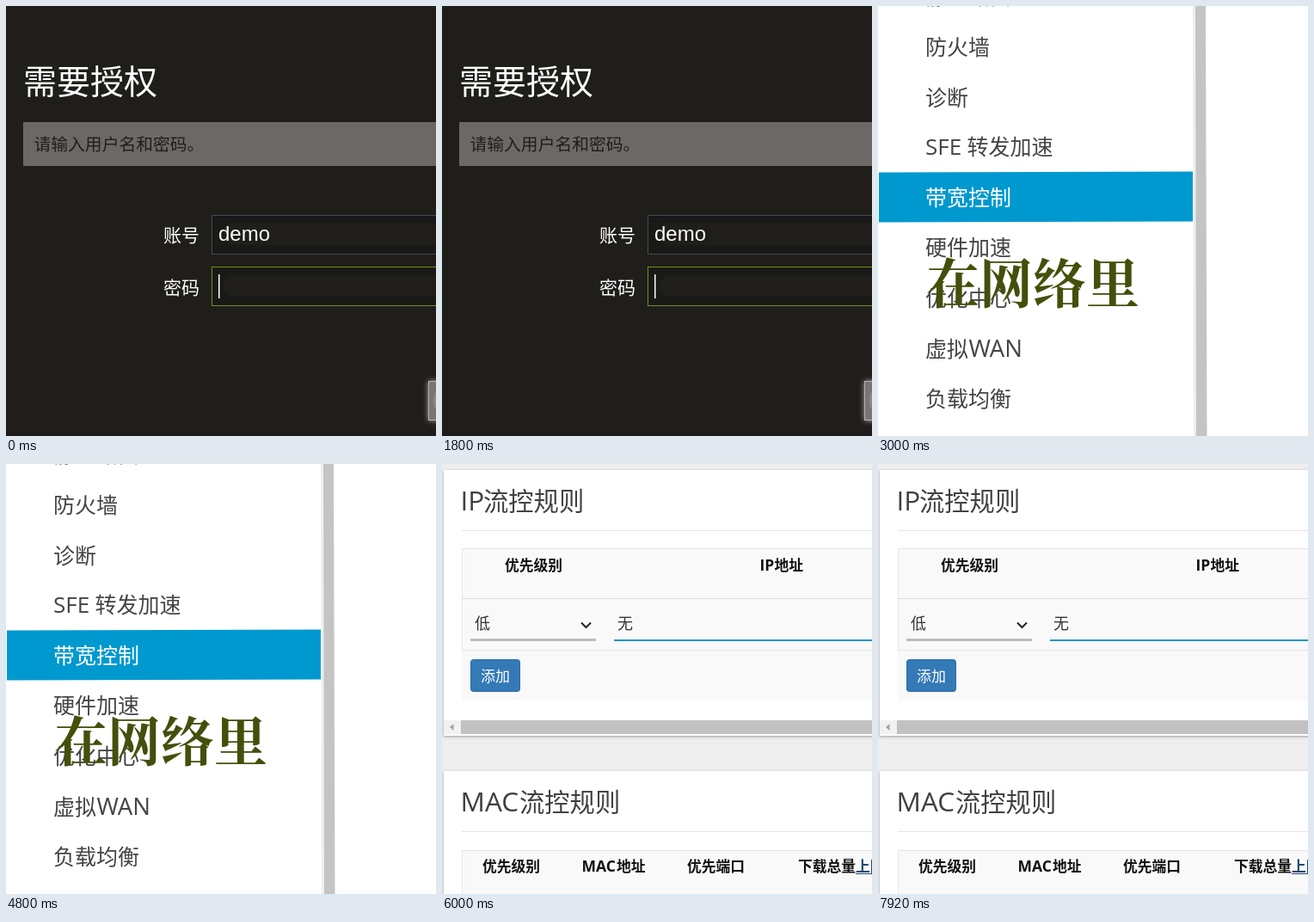
Write an HTML page with a canvas that moves like this. It is 500 px wide and 500 px high and loops after 9.2 s.

```html
<!DOCTYPE html>
<html lang="zh-CN">
<head>
<meta charset="utf-8">
<style>
html, body { margin: 0; width: 100%; height: 100%; overflow: hidden; }
canvas { display: block; width: 500px; height: 500px; }
</style>
</head>
<body>
<canvas id="stage" width="500" height="500"></canvas>
<script>
const ctx = document.getElementById('stage').getContext('2d');
const CJK = '"Noto Sans CJK SC", "Noto Sans CJK", sans-serif';
const LATIN = '"Open Sans", "Noto Sans CJK SC", sans-serif';
const ARIAL = '"Liberation Sans", Arial, sans-serif';
const SERIF = '"Noto Serif CJK SC", "Noto Sans CJK SC", serif';

function rect(x, y, w, h, color) {
  ctx.fillStyle = color;
  ctx.fillRect(x, y, w, h);
}

function frame(x, y, w, h, color) {
  ctx.strokeStyle = color;
  ctx.lineWidth = 1;
  ctx.strokeRect(x + 0.5, y + 0.5, w - 1, h - 1);
}

function shape(points, color) {
  ctx.beginPath();
  points.forEach(([x, y]) => ctx.lineTo(x, y));
  ctx.fillStyle = color;
  ctx.fill();
}

function pill(x, y, w, h, r, color) {
  ctx.beginPath();
  ctx.roundRect(x, y, w, h, r);
  ctx.fillStyle = color;
  ctx.fill();
}

// Text is placed by its left edge and baseline.
function text(str, x, y, size, color, family = CJK, weight = 400) {
  ctx.font = `${weight} ${size}px ${family}`;
  ctx.fillStyle = color;
  ctx.fillText(str, x, y);
}

function field(y, border) {
  rect(239, y, 270, 46, '#191917');
  pill(252, y + 10, 270, 25, 12, '#1f1e1b');
  frame(239, y, 270, 46, border);
}

function drawLogin() {
  rect(0, 0, 500, 500, '#1f1e1b');
  text('需要授权', 20, 102, 39, '#fff', CJK, 500);
  rect(20, 135, 480, 51, '#6b6966');

  text('请输入用户名和密码。', 32.5, 168, 19.8, '#1f1e1b');
  text('账号', 183, 274, 21, '#fff', CJK, 500);
  text('密码', 183, 335, 21, '#fff', CJK, 500);
  field(243, '#4a4a52');
  rect(240, 244, 260, 1, '#12122c');
  field(303, '#748f10');
  text('demo', 247, 273, 24, '#fff', ARIAL);
  rect(247, 312, 1.5, 28, '#fff');

  ctx.save();
  ctx.shadowColor = '#aaa';
  ctx.shadowBlur = 6;
  rect(491, 436, 20, 46, '#777672');
  ctx.restore();
  frame(491, 436, 20, 46, '#b5b4b0');
  pill(497, 446, 20, 26, 10, '#8b8a87');
  rect(0, 495, 500, 5, '#1c1b19');
}

function drawMenu() {
  rect(0, 0, 500, 500, '#fff');
  shape([[366, 0], [369, 0], [370, 500], [367, 500]], '#eee');
  shape([[369, 0], [381, 0], [382.5, 500], [370, 500]], '#c4c4c4');
  shape([[1, 193.5], [366, 192.5], [366, 250.5], [1, 251.5]], '#0099cf');

  const ink = '#444';
  text('静态路由', 55, -2.5, 25, ink);
  text('防火墙', 55, 56.5, 25, ink);
  text('诊断', 55, 115.5, 25, ink);
  text('SFE', 55, 173, 26, ink, LATIN);
  text('转发加速', 103.5, 173, 25, ink);
  text('带宽控制', 55, 231.5, 25, '#fff', CJK, 500);
  text('硬件加速', 55, 290, 25, ink);
  text('优化中心', 55, 349, 25, ink);
  text('虚拟', 55, 407.5, 25, ink);
  text('WAN', 105.5, 407.5, 27.5, ink, LATIN);
  text('负载均衡', 55, 466, 25, ink);
  text('在网络里', 56, 346, 62, '#454f0b', SERIF, 600);
}

function panel(y, h, latin, title, titleX) {
  ctx.save();
  ctx.shadowColor = 'rgba(0,0,0,.35)';
  ctx.shadowBlur = 3;
  ctx.shadowOffsetY = 1;
  rect(2, y, 510, h, '#fff');
  ctx.restore();
  text(latin, 21.5, y + 46.5, 31.5, '#404040', LATIN);
  text(title, titleX, y + 46.5, 29.3, '#404040');
  rect(23, y + 70, 477, 1, '#e5e5e5');
}

function heading(latin, str, x, strX, y) {
  if (latin) text(latin, x, y, 17.5, '#111', LATIN, 700);
  text(str, strX, y, 16.8, '#111', CJK, 700);
}

function drawRules() {
  rect(0, 0, 500, 500, '#eee');
  panel(7, 309, 'IP', '流控规则', 48);
  rect(23, 98, 477, 177, '#f9f9f9');
  frame(23, 98, 490, 119, '#e6e6e6');
  rect(23, 156, 477, 1, '#ddd');
  heading('', '优先级别', 0, 73, 124);
  heading('IP', '地址', 369.5, 386.5, 124);

  text('低', 38, 192, 18, '#333');
  ctx.beginPath();
  ctx.moveTo(162, 184.5);
  ctx.lineTo(167.5, 190);
  ctx.lineTo(173, 184.5);
  ctx.strokeStyle = '#222';
  ctx.lineWidth = 2;
  ctx.stroke();
  rect(33, 203, 146, 3, '#bdbdbd');
  text('无', 204, 192, 18, '#333');
  rect(200, 204, 300, 2, '#2494ca');

  pill(33, 227, 58, 38, 4, '#2e6da4');
  pill(34, 228, 56, 36, 3, '#337ab7');
  text('添加', 45, 253, 17, '#fff');

  rect(2, 298, 498, 16, '#f1f1f1');
  rect(22, 298, 478, 16, '#c1c1c1');
  shape([[9, 306], [13.5, 302], [13.5, 310]], '#a3a3a3');

  panel(357, 160, 'MAC', '流控规则', 90);
  rect(23, 449, 477, 51, '#f9f9f9');
  frame(23, 449, 490, 80, '#e6e6e6');
  heading('', '优先级别', 0, 47, 474);
  heading('MAC', '地址', 162.5, 203, 474);
  heading('', '优先端口', 0, 285, 474);
  heading('', '下载总量', 0, 414, 474);
  text('上限', 481, 474, 16.8, '#24486c', CJK, 700);
  rect(481, 476, 19, 1, '#24486c');
}

function tick(now) {
  const t = now % 9200;
  if (t < 3000) drawLogin();
  else if (t < 6000) drawMenu();
  else drawRules();
  requestAnimationFrame(tick);
}
requestAnimationFrame(tick);
</script>
</body>
</html>
```
